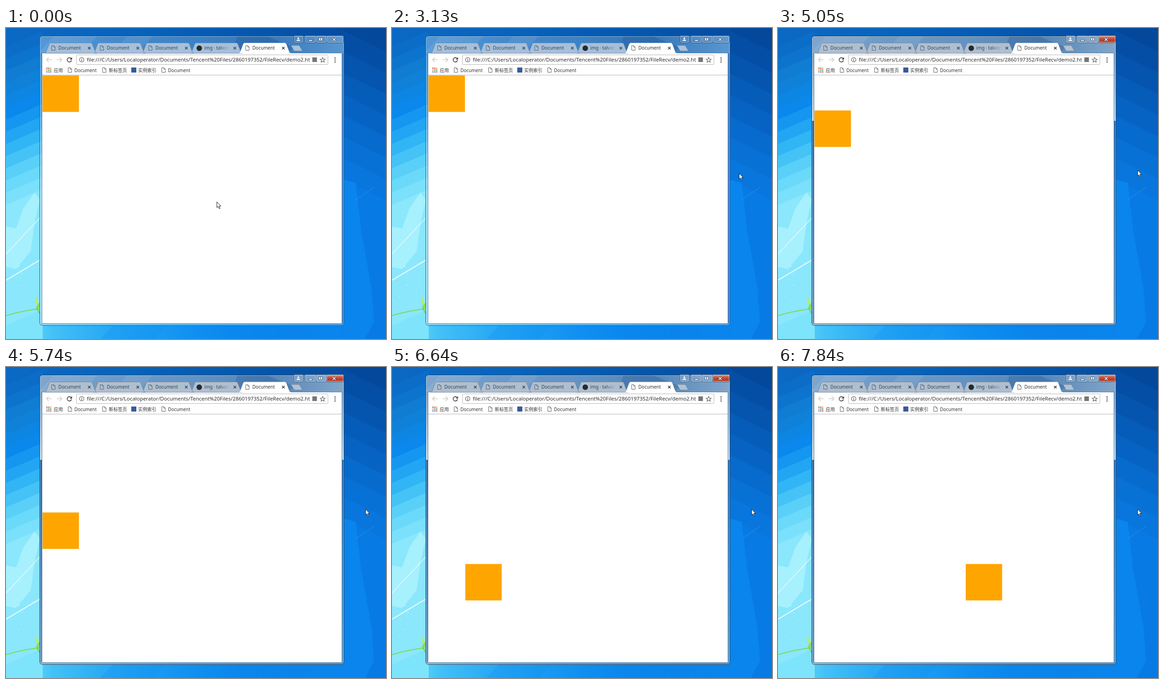
Recreate the animation shown at these times as an HTML page with a canvas. Size 828 px wide and 677 px high, loop 7.99 s.

```html
<!DOCTYPE html>
<html lang="en">
<head>
<meta charset="utf-8">
<title>Moving box</title>
<style>
html, body { margin: 0; width: 100%; height: 100%; overflow: hidden; }
canvas { display: block; width: 828px; height: 677px; }
</style>
</head>
<body>
<canvas id="stage" width="828" height="677"></canvas>
<script>
const ctx = document.getElementById('stage').getContext('2d');
const W = 828, H = 677, LOOP = 7990;
const FONT = '"Noto Sans", "Noto Sans CJK SC", "Noto Sans CJK", sans-serif';

const POINTER_LEAVES = 3130, ACTIVATED = 3370, BOX_STARTS = 4780;
const BOX_SIZE = 79.3, BOX_SPEED = 0.2078, BOX_LEAD = 20, DROP = 325.4;

// ---- drawing helpers

function rect(x, y, w, h, fill) {
  ctx.fillStyle = fill;
  ctx.fillRect(x, y, w, h);
}
function trace(points, closed) {
  ctx.beginPath();
  points.forEach(([x, y]) => ctx.lineTo(x, y));
  if (closed) ctx.closePath();
}
function poly(points, fill, stroke, width = 1) {
  trace(points, true);
  if (fill) { ctx.fillStyle = fill; ctx.fill(); }
  if (stroke) { ctx.strokeStyle = stroke; ctx.lineWidth = width; ctx.stroke(); }
}
function line(points, color, width = 1) {
  trace(points, false);
  ctx.strokeStyle = color;
  ctx.lineWidth = width;
  ctx.stroke();
}
function ellipse(x, y, rx, ry, fill, tilt = 0) {
  ctx.beginPath();
  ctx.ellipse(x, y, rx, ry, tilt, 0, Math.PI * 2);
  ctx.fillStyle = fill;
  ctx.fill();
}
function arc(x, y, r, from, to, color, width) {
  ctx.beginPath();
  ctx.arc(x, y, r, from, to);
  ctx.strokeStyle = color;
  ctx.lineWidth = width;
  ctx.stroke();
}
function frame(x, y, w, h, r, stroke, fill) {
  ctx.beginPath();
  ctx.roundRect(x, y, w, h, r);
  if (fill) { ctx.fillStyle = fill; ctx.fill(); }
  ctx.strokeStyle = stroke;
  ctx.lineWidth = 1;
  ctx.stroke();
}
// evenly spaced colour stops
function gradient(x0, y0, x1, y1, ...colors) {
  const g = ctx.createLinearGradient(x0, y0, x1, y1);
  colors.forEach((color, i) => g.addColorStop(i / (colors.length - 1), color));
  return g;
}
function text(str, x, y, size, color) {
  ctx.font = `${size}px ${FONT}`;
  ctx.fillStyle = color;
  ctx.fillText(str, x, y);
}
function cross(x, y, r, color, width = 1.4) {
  line([[x - r, y - r], [x + r, y + r]], color, width);
  line([[x + r, y - r], [x - r, y + r]], color, width);
}
const lerp = (a, b, u) => a + (b - a) * u;
function mix(colors, u) {
  const at = u * (colors.length - 1), i = Math.min(Math.floor(at), colors.length - 2);
  const channel = (color, c) => parseInt(color.slice(1 + c * 2, 3 + c * 2), 16);
  const rgb = [0, 1, 2].map(c => Math.round(lerp(channel(colors[i], c), channel(colors[i + 1], c), at - i)));
  return `rgb(${rgb})`;
}
function seeded(seed) {
  return () => (seed = seed * 16807 % 2147483647) / 2147483647;
}

// ---- desktop

// slanted stripes, each covering everything below its upper edge
function bands(x0, x1, top, bottom, slant, count, colors) {
  for (let i = 0; i < count; i++) {
    const u = i / (count - 1), y = lerp(top, bottom, u);
    poly([[x0, y], [x1, y + slant], [x1, H], [x0, H]], mix(colors, u));
  }
}

function wallpaper() {
  rect(0, 0, W, H, gradient(0, 0, W, 0, '#0b69c4', '#0763bc', '#0556ad', '#04479a'));
  rect(0, 645, W, 32, gradient(0, 0, W, 0,
    '#7be4fb', '#43c1f7', '#2cabf5', '#1c9df3', '#0f8ff0', '#0a86ed', '#0a84ea', '#0985ed', '#0878e0'));
  poly([[236, 645], [350, 645], [322, H], [205, H]], 'rgba(10,140,240,.25)');

  bands(0, 80, 40, 385, -34, 14, ['#0b6dc8', '#1180d5', '#0a89ee', '#2db2f5', '#62d6fa', '#8ae7fc']);
  poly([[0, 432], [22, 436], [38, 392], [62, 358], [74, 374], [62, 425], [54, 486], [22, 525], [0, 520]], '#a7f0fd');
  poly([[0, 648], [80, 612], [80, H], [0, H]], '#7de4fb');
  line([[0, 492], [74, 413]], 'rgba(255,255,255,.75)', 1.4);
  line([[0, 549], [74, 505]], 'rgba(255,255,255,.8)', 2.2);
  const random = seeded(11);
  for (let i = 0; i < 9; i++) {
    const r = 0.6 + random() * 0.7;
    ellipse(random() * 72, 510 + random() * 105, r, r, '#e9fdff');
  }

  ctx.beginPath();
  ctx.moveTo(0, 626);
  ctx.quadraticCurveTo(38, 615, 74, 611);
  ctx.strokeStyle = '#7fd957';
  ctx.lineWidth = 2;
  ctx.stroke();
  ellipse(67, 595, 3, 8, '#b5ec72', -0.4);
  ellipse(70, 606, 3, 9, '#8edb4f', 0.5);
  line([[68, 611], [74, 623]], '#6cc653', 2);

  bands(736, W, -40, 330, 45, 9, ['#04489b', '#0554ae', '#0663c3', '#0871d6', '#087ae4']);
  poly([[736, 330], [762, 337], [774, 440], [797, 570], [802, 640], [782, H], [736, H]], '#0985ed');
  line([[762, 374], [803, 346]], 'rgba(90,180,255,.4)');
}

// ---- browser window

function captionButtons(active) {
  const edge = active ? '#405a78' : '#204b80', shine = 'rgba(255,255,255,.5)';
  const glass = active ? 'rgba(190,210,230,.2)' : 'rgba(120,170,220,.15)';
  const red = gradient(0, 18, 0, 33, '#d99385', '#c4523d', '#b43a24', '#cf6d4d');
  const button = (x, w, fill) => {
    frame(x + 0.5, 16.5, w, 16, [0, 0, 4, 4], edge, fill);
    frame(x + 1.5, 17.5, w - 2, 14, [0, 0, 3, 3], shine);
  };
  button(627, 20, glass);
  button(651, 24, glass);
  button(675, 23, glass);
  button(698, 37, active ? red : glass);
  ellipse(637, 22.5, 1.8, 2, '#fff');
  poly([[633, 28], [634, 25.5], [640, 25.5], [641, 28]], '#fff');
  rect(659, 25.5, 9, 3.5, '#3d526e');
  rect(660, 26.2, 7, 2, '#fff');
  frame(681.5, 21.5, 8, 6, 1, '#3d526e', '#fff');
  rect(684, 23.5, 3, 2, '#3d526e');
  cross(715, 25, 3, '#40536e', 3.4);
  cross(715, 25, 3, '#fff');
}

function windowFrame(active) {
  ctx.save();
  ctx.beginPath();
  ctx.roundRect(73.5, 17.5, 663, 630, 6);
  ctx.clip();
  rect(73, 17, 664, 631, 'rgba(190,225,245,.3)');
  const title = active
    ? ['#7ea6cf', '#6c9ac8', '#6493c2', '#5485b7', '#83a6c9']
    : ['#5399d9', '#438bcf', '#3b82c8', '#3577bb', '#5a97cf'];
  rect(73, 17, 664, 38, gradient(73, 0, 737, 0, ...title));
  for (const [x, w] of [[105, 95], [265, 55]]) {
    poly([[x, 17], [x + w, 17], [x + w - 35, 55], [x - 35, 55]], 'rgba(255,255,255,.08)');
  }
  poly([[505, 17], [565, 17], [628, 42], [612, 55], [490, 55]], 'rgba(20,65,130,.22)');
  if (active) {
    for (const x of [73, 732]) {
      rect(x, 55, 6, 147, gradient(0, 55, 0, 202, '#7da3c9', '#c6deec'));
      rect(x, 202, 6, 446, gradient(0, 202, 0, 648, '#2467a6', '#3d84bf', '#5f9bc8'));
    }
    rect(73, 643, 664, 5, gradient(73, 0, 737, 0, '#81b9d4', '#5c98c7', '#5488b9'));
  } else {
    rect(73, 643, 664, 5, gradient(73, 0, 737, 0, '#82d9f4', '#55b2ee', '#4093dc'));
  }
  ctx.restore();
  frame(73.5, 17.5, 663, 630, 6, active ? '#243a52' : '#234f7d');
  frame(74.5, 18.5, 661, 628, 5, 'rgba(225,245,255,.45)');
  frame(78.5, 54.5, 653.5, 589, 0, active ? '#597f9e' : '#4d86b4');
  captionButtons(active);
}

function pageIcon(x, y, color) {
  poly([[x + 0.5, y + 0.5], [x + 5, y + 0.5], [x + 8, y + 3.5], [x + 8, y + 10.5], [x + 0.5, y + 10.5]], null, color);
  line([[x + 5, y + 0.5], [x + 5, y + 3.5], [x + 8, y + 3.5]], color);
}

function tab(index, fill, edge, ink) {
  const x = 85 + index * 105.7;
  poly([[x, 55], [x + 2, 53.5], [x + 9, 35], [x + 11, 32.5], [x + 101, 32.5], [x + 103, 35],
    [x + 110, 53.5], [x + 113, 55]], fill, edge);
  if (index === 3) {
    ellipse(x + 19, 44, 6, 6, '#24292e');
    text('img · talvori', x + 30, 47, 10, gradient(x + 62, 0, x + 86, 0, ink, fill));
  } else {
    pageIcon(x + 14, 38, '#5a6067');
    text('Document', x + 29, 47, 10, ink);
  }
  cross(x + 96.5, 43.7, 2.8, ink);
}

function tabs(active) {
  const idle = active ? '#aebfd1' : '#a6bfda';
  const edge = active ? '#73869d' : '#6789af';
  poly([[621, 38], [639, 38], [646, 50], [628, 50]], active ? '#b2c2d3' : '#a8c1db', edge);
  for (let i = 3; i >= 0; i--) tab(i, idle, edge, '#3a4148');
  tab(4, '#fff', null, '#303030');
}

function arrow(x, dir) {
  line([[x - 5.5, 69], [x + 5.5, 69]], '#c9c9c9', 1.4);
  line([[x + dir, 64], [x + dir * 5.8, 69], [x + dir, 74]], '#c9c9c9', 1.4);
}

function toolbar() {
  arrow(94, -1);
  arrow(116, 1);
  arc(138, 69.3, 4.7, 0.2, Math.PI * 1.75, '#454545', 1.7);
  poly([[144, 63.5], [144, 68.7], [138.8, 68.7]], '#454545');

  frame(153.5, 58.5, 548, 21, 2, '#b5b5b5', '#fff');
  arc(165, 69, 4.8, 0, Math.PI * 2, '#555', 1.1);
  rect(164.4, 68, 1.3, 4, '#555');
  rect(164.4, 65.8, 1.3, 1.3, '#555');

  ctx.save();
  ctx.beginPath();
  ctx.rect(174, 60, 488.5, 18);
  ctx.clip();
  text('file:///C:/Users/Localoperator/Documents/Tencent%20Files/2860197352/FileRecv/demo2.html', 176, 73, 11.4, '#303030');
  ctx.restore();

  rect(667.5, 64, 10, 10, '#767676');
  const star = Array.from({ length: 10 }, (_, i) => {
    const r = i % 2 ? 2.5 : 5.8, a = i * Math.PI / 5 - Math.PI / 2;
    return [690 + r * Math.cos(a), 69.7 + r * Math.sin(a)];
  });
  poly(star, null, '#5a5a5a', 1.1);
  for (let i = -1; i <= 1; i++) ellipse(717, 69.6 + i * 4.4, 1.4, 1.4, '#555');
}

function bookmarks() {
  const dots = ['#db4437', '#e99a36', '#3e9b5b', '#4285f4'];
  for (let i = 0; i < 9; i++) {
    rect(88 + i % 3 * 4, 86.3 + Math.floor(i / 3) * 4, 2.6, 2.6, dots[Math.floor(i / 2) % 4]);
  }
  const item = (label, x) => text(label, x, 95.5, 9.9, '#333');
  const page = (label, x) => { pageIcon(x, 86, '#606060'); item(label, x + 14); };
  item('应用', 104);
  page('Document', 135);
  page('新标签页', 210);
  rect(273, 86, 11, 11, '#3b5998');
  item('实例索引', 288);
  page('Document', 339);
  rect(79, 102, 652.5, 1, '#b4b4b4');
}

// ---- motion

// The picture refreshes every 4 or 5 ticks of 30 ms, in a slowly swaying rhythm.
function refreshed(t) {
  const origin = t < POINTER_LEAVES ? 0 : t < BOX_STARTS ? POINTER_LEAVES : BOX_STARTS;
  const tick = k => Math.max(0, Math.floor(4.47 * k - 0.7 * Math.sin(Math.PI / 5 * (k - 1.3)) + 0.37));
  const now = (t - origin) / 30;
  let k = Math.ceil(now / 4.47) + 1;
  while (k > 0 && tick(k) > now) k--;
  return origin + tick(k) * 30;
}

function box(t) {
  const moved = t < BOX_STARTS ? 0 : BOX_LEAD + (t - BOX_STARTS) * BOX_SPEED;
  const x = 79.6 + Math.max(0, moved - DROP - 1);
  const y = 103.4 + Math.min(moved, DROP);
  rect(x, y, BOX_SIZE, BOX_SIZE, '#ffa500');
}

function pointer(t) {
  const stops = [[0, 459, 378], [240, 609, 275], [510, 773, 311], [3100, 773, 315],
    [3340, 634, 322], [3520, 634, 322], [3850, 783, 309], [LOOP, 783, 309]];
  const i = stops.findIndex(stop => stop[0] > t);
  const [from, to] = [stops[i - 1], stops[i]];
  const u = (t - from[0]) / (to[0] - from[0]);
  const x = Math.round(lerp(from[1], to[1], u)) + 0.5, y = Math.round(lerp(from[2], to[2], u)) + 0.5;
  const shape = [[0, 0], [0, 12.5], [2.9, 9.9], [5, 14.8], [7, 14], [4.9, 9.2], [8.8, 9.2]];
  poly(shape.map(([a, b]) => [x + a, y + b]), '#fff', '#1c1c1c');
}

function draw(t) {
  const active = t >= ACTIVATED, shown = refreshed(t);
  wallpaper();
  windowFrame(active);
  rect(79, 55, 652.5, 588, '#fff');
  tabs(active);
  toolbar();
  bookmarks();
  box(shown);
  pointer(shown);
}

const start = performance.now();
function animate() {
  draw((performance.now() - start) % LOOP);
  requestAnimationFrame(animate);
}
animate();
</script>
</body>
</html>
```
